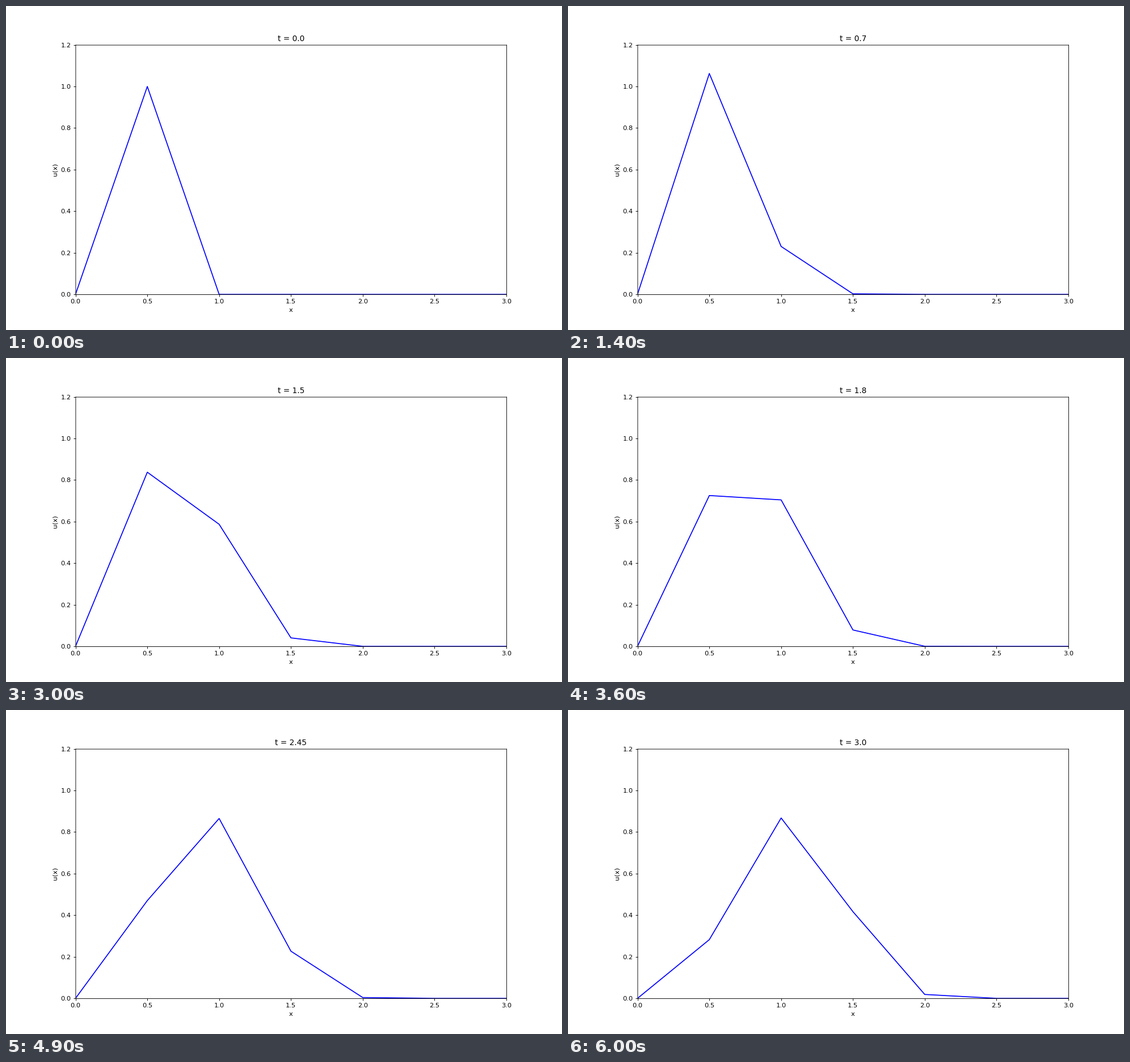
Recreate the animation shown at these times as a matplotlib script. Size 980 by 572 pixels, loop 6.1 s.

```python
import numpy as np
import matplotlib.pyplot as plt
from matplotlib.animation import FuncAnimation
from matplotlib.transforms import ScaledTranslation

W, H = 980, 572
DPI = W / 12
DX, DT = 0.5, 0.05
STEPS = 60
x = np.arange(7) * DX


def hat(s):
    """Narrow triangular pulse around 0.5."""
    return np.maximum(0, 1 - np.abs(s - 0.5) / 0.2)


def flux(u):
    return u ** 2 / 2


def step(u, t):
    """One two-step Lax-Wendroff update of Burgers' equation."""
    lam = DT / DX
    mid = (u[1:] + u[:-1]) / 2 - lam / 2 * np.diff(flux(u))
    new = u.copy()
    new[1:-1] -= lam * np.diff(flux(mid))
    new[0] = hat(t)
    return new


def solve():
    states = [hat(x)]
    for n in range(1, STEPS + 1):
        states.append(step(states[-1], n * DT))
    return states


states = solve()

# the tiny margin keeps the pixel size from being rounded down
fig, ax = plt.subplots(figsize=((W + 1e-6) / DPI, (H + 1e-6) / DPI), dpi=DPI)
line, = ax.plot(x, states[0], color="blue", lw=1.5)
ax.set_xlim(0, 3)
ax.set_ylim(0, 1.2)
ax.set_xlabel("x")
ax.set_ylabel("u(x)")
title = ax.set_title("t = 0.0")

# soft frame lines, off the pixel grid
shift = ScaledTranslation(0.005, -0.005, fig.dpi_scale_trans)
for spine in ax.spines.values():
    spine.set_snap(False)
    spine.set_transform(spine.get_spine_transform() + shift)


def draw(n):
    line.set_ydata(states[n])
    title.set_text(f"t = {round(n * DT, 2)}")
    return line, title


anim = FuncAnimation(fig, draw, frames=STEPS + 1, interval=100,
                     repeat=True, repeat_delay=0, blit=False)
plt.show()
```
